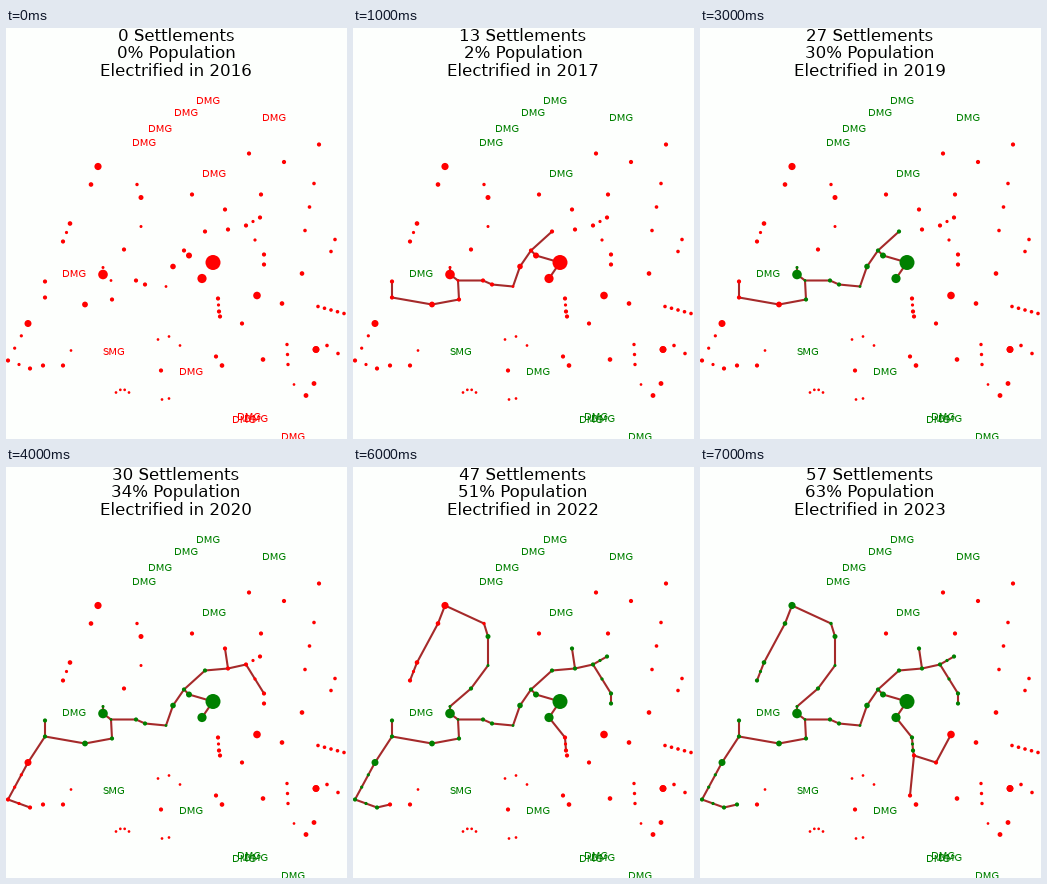
These frames come from a looping animation (341x411 px, 8000 ms). A matplotlib script:

```python
import matplotlib.pyplot as plt
from matplotlib.animation import FuncAnimation

plt.rcParams["font.family"] = "DejaVu Sans"
plt.rcParams["text.hinting"] = "native"

W, H, DPI = 341, 411, 100
START, YEARS, NEVER = 2016, 8, 9999
PERCENT = [0, 2, 15, 30, 34, 45, 51, 63]

fig = plt.figure(figsize=(W / DPI + 1e-6, H / DPI + 1e-6), dpi=DPI,
                 facecolor="#fdfffd")
ax = fig.add_axes([0, 0, 1, 1])
ax.set_xlim(0, W)
ax.set_ylim(H - 0.5, -0.5)
ax.axis("off")

links = []   # (year built, line)
nodes = []   # (x, y, radius, year electrified)


def blend(a, b, t):
    return a[0] + (b[0] - a[0]) * t, a[1] + (b[1] - a[1]) * t


def branch(built, powered, start, *legs):
    """Extend the grid; each leg (x, y, radius, stops) spaces its stops evenly."""
    path = [start]
    for x, y, *rest in legs:
        radius, stops = (rest + [2.1, 1][len(rest):])
        for k in range(1, stops + 1):
            size = radius if k == stops else 1.6
            nodes.append((*blend(path[-1], (x, y), k / stops), size, powered))
        path.append((x, y))
    line, = ax.plot(*zip(*path), color="brown", lw=1.5, zorder=1)
    links.append((built, line))


def hamlets(a, b, count, radius=2.1, sag=0):
    """Unconnected settlements spread along an arc from a to b."""
    for k in range(count):
        t = k / (count - 1)
        x, y = blend(a, b, t)
        nodes.append((x, y + sag * 4 * t * (1 - t), radius, NEVER))


# Trunk line
capital = (207, 234)
branch(2017, 2018, capital, (*capital, 7.5, 2), (196, 250, 4.6))
branch(2017, 2019, capital, (183, 227, 3), (178, 222), (199, 203))
branch(2017, 2019, (178, 222), (167, 238, 2.8), (160, 258, 1.4), (139, 256),
       (130, 252), (105, 252, 1.4), (97, 246, 4.8), (97, 239, 1.5))
branch(2017, 2019, (105, 252), (106, 271))
branch(2017, 2020, (106, 271), (79, 276, 2.9), (39, 269), (39, 253))

# South-west and east
branch(2020, 2021, (39, 269), (22, 295, 3.5), (2, 332, 2.1, 3),
       (24, 340, 2.1, 2))
branch(2020, 2021, (199, 203), (222, 201), (219, 181))
branch(2020, 2021, (222, 201), (240, 197), (258, 226, 2.1, 2))

branch(2021, 2022, (97, 239), (118, 221), (135, 198, 1.5), (135, 169, 2.5))
branch(2021, 2022, (240, 197), (254, 189, 2.1, 2))
branch(2021, 2022, (258, 226), (258, 236))

# North-west and south
branch(2022, 2023, (135, 169), (131, 156, 1.7), (92, 138, 3.6),
       (85, 156, 2.3), (64, 195, 2.3), (57, 213, 2.1, 2))
branch(2022, 2023, (196, 250), (212, 270), (213, 283, 2.1, 2))
branch(2022, 2023, (24, 340), (37, 337))
branch(2023, NEVER, (213, 283), (214, 288), (236, 295), (251, 267, 3.8))
branch(2023, NEVER, (214, 288), (210, 328))

# Beyond the grid
hamlets((243, 125), (313, 116), 3, sag=13)
hamlets((186, 166), (255, 166), 2)
hamlets((308, 155), (299, 202), 3, 1.8)
hamlets((329, 211), (325, 223), 2, 1.8)
hamlets((276, 275), (296, 245), 2, 2.3)
hamlets((312, 278), (338, 285), 5, 1.8)
hamlets((281, 316), (282, 336), 3, 1.7)
hamlets((310, 321), (332, 325), 3, 1.8, sag=-6)
hamlets((310, 321), (310, 321), 2, 3.4)
hamlets((300, 367), (308, 355), 2, 2.4)
hamlets((216, 337), (257, 331), 2, 2.3)
hamlets((155, 342), (57, 337), 2)
hamlets((65, 322), (288, 356), 2, 1.35)
hamlets((152, 311), (174, 317), 3, 1.35, sag=-6)
hamlets((110, 364), (123, 364), 4, 1.35, sag=-3)
hamlets((156, 371), (163, 370), 2, 1.35)

px = 72 / DPI
dots = ax.scatter([n[0] for n in nodes], [n[1] for n in nodes],
                  s=[(2 * n[2] * px) ** 2 for n in nodes],
                  linewidths=0, zorder=2)


def text(x, y, words, size):
    return ax.text(x, y, words, size=size, ha="center", va="baseline",
                   zorder=3)


diesel = [(202, 72), (180, 84), (154, 100), (138, 114), (268, 89), (208, 145),
          (68, 245), (185, 343), (238, 391), (243, 388), (250, 390),
          (287, 408)]
labels = [text(x, y + 3, "DMG", 7.2) for x, y in diesel]
labels.append(text(108, 326, "SMG", 7.2))
title = [text(170, y, "", 12) for y in (12, 29, 47)]


def draw(i):
    year = START + i
    powered = [year >= n[3] for n in nodes]
    settled = len(labels) + sum(powered) if i else 0
    rows = (f"{settled} Settlements", f"{PERCENT[i]}% Population",
            f"Electrified in {year}")
    for line, row in zip(title, rows):
        line.set_text(row)
    for label in labels:
        label.set_color("green" if i else "red")
    for built, line in links:
        line.set_visible(year >= built)
    dots.set_facecolor(["green" if p else "red" for p in powered])
    return [dots, *title, *labels, *(line for _, line in links)]


anim = FuncAnimation(fig, draw, frames=YEARS, interval=1000, repeat=True,
                     init_func=lambda: draw(0))
plt.show()
```
